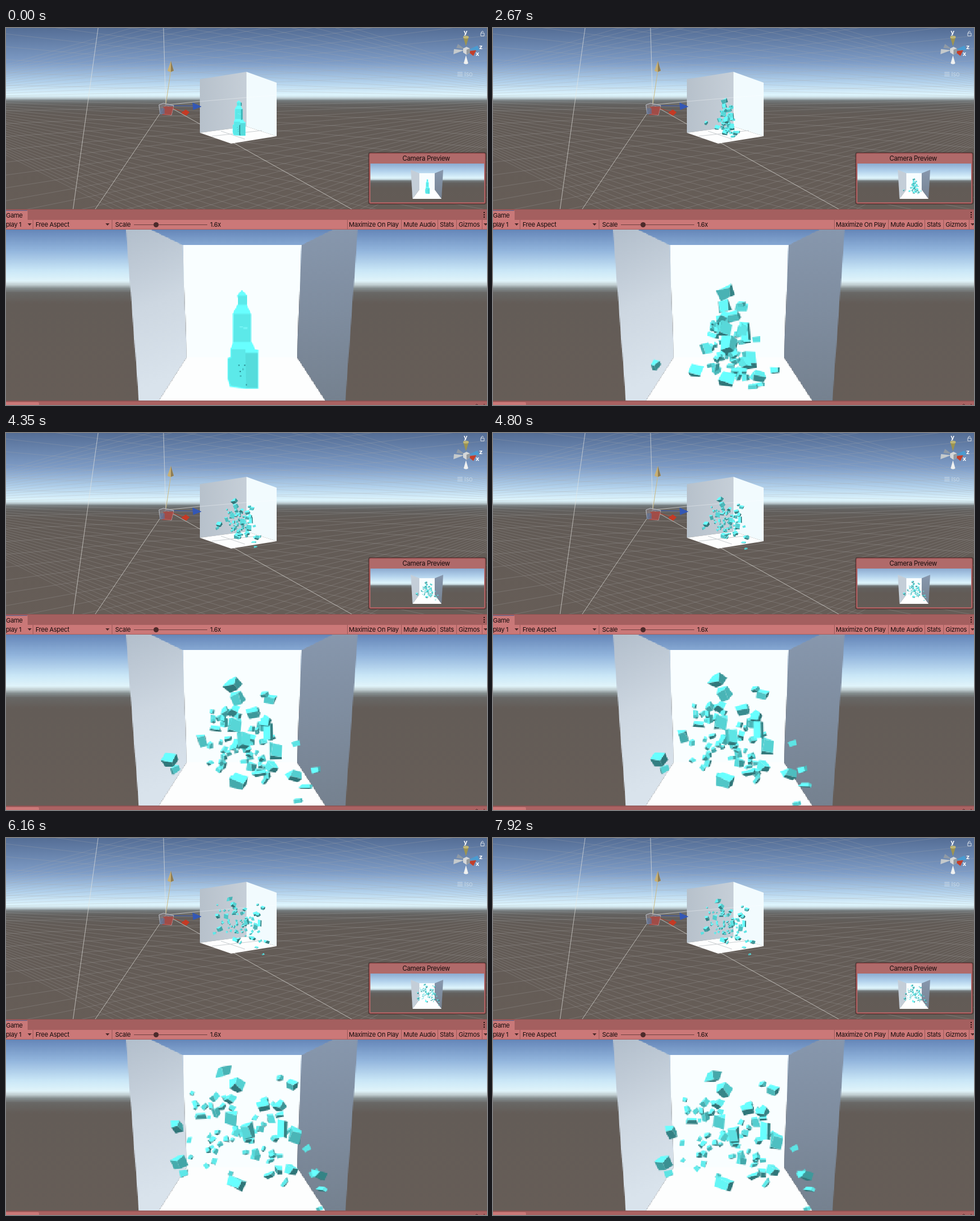
Write an HTML page with a canvas that moves like this. It is 846x662 px and loops after 7990 ms.

```html
<!DOCTYPE html>
<html lang="en">
<head>
<meta charset="utf-8">
<title>Shatter preview</title>
<style>
html, body { margin: 0; width: 100%; height: 100%; overflow: hidden; background: #635c57; }
svg, canvas { position: absolute; left: 0; top: 0; display: block; }
#game { top: 354px; width: 846.4px; height: 300.8px; image-rendering: pixelated; }
#foot { top: 654px; }
text { font: 11px Inter, "Open Sans", sans-serif; letter-spacing: -.3px; fill: #160b0b; }
</style>
</head>
<body>
<svg id="ui" width="846" height="662" viewBox="0 0 846 662">
  <defs>
    <linearGradient id="sky" x2="0" y2="1">
      <stop offset="0" stop-color="#546d95"/><stop offset=".19" stop-color="#7e9cc6"/>
      <stop offset=".3" stop-color="#b3d2ec"/><stop offset=".37" stop-color="#def5fd"/>
      <stop offset=".387" stop-color="#c3d6dd"/><stop offset=".4" stop-color="#747b7d"/>
      <stop offset=".425" stop-color="#62605e"/><stop offset=".48" stop-color="#625b56"/>
      <stop offset="1" stop-color="#665d57"/>
    </linearGradient>
    <linearGradient id="side"><stop offset="0" stop-color="#b7c1cb"/><stop offset="1" stop-color="#c6cfd8"/></linearGradient>
    <linearGradient id="dim" x2="0" y2="1"><stop offset="0" stop-color="#8797ad"/><stop offset="1" stop-color="#778392"/></linearGradient>
    <clipPath id="top"><path d="M0 0H846V318H0Z"/></clipPath>
  </defs>

  <g clip-path="url(#top)">
    <rect width="846" height="318" fill="url(#sky)"/>
    <path id="grid" fill="none" stroke="#a9aaa9" stroke-opacity=".27"/>
    <g fill="none" stroke="#e6e6e2" stroke-opacity=".65">
      <path d="M162 0 118 318M277 0 281 135 157 318M281 135 608 318M281 135 341 129"/>
    </g>
    <path d="M341 90 423 77V173L341 184Z" fill="url(#side)"/>
    <path d="M423 77 476 96V190L423 173Z" fill="#f2fbfe"/>
    <path d="M341 184 423 173 476 190 396 203Z" fill="#fdfefe"/>
    <path d="M362 190 450 180M378 181 420 195" stroke="#c9cdd0" fill="none"/>
    <path d="M341 129 423 122 476 118" stroke="#fff" stroke-opacity=".35" fill="none"/>

    <path d="M281 135 290 74" stroke="#cbb983"/>
    <path d="M290 58 284 75Q289 79 295 75Z" fill="#c9b073"/>
    <path d="M290 58 290 77 295 75Z" fill="#8e7d55"/>
    <path d="M281 136 330 137" stroke="#3f5fb8"/>
    <path d="M328 131 344 138 329 144Z" fill="#3357b5"/>
    <path d="M281 137 312 147" stroke="#b8412c"/>
    <path d="M308 149 316 143 323 148 317 154Z" fill="#c53a24"/>
    <path d="M269 135 277 132 295 136 291 153 271 150Z" fill="#8b7f83" fill-opacity=".65" stroke="#b9c0c9"/>
    <path d="M277 138H295L291 153H275Z" fill="#b03c35" fill-opacity=".7"/>
    <path d="M271 141H279V151H270Z" fill="#5e7297" fill-opacity=".7"/>

    <path d="M804 15H814L809 32Z" fill="#9d9450"/><ellipse cx="809" cy="16" rx="5" ry="2.5" fill="#c0b777"/>
    <path d="M809 48 805 62Q809 65 813 62Z" fill="#f0f1f0"/>
    <path d="M806 39 788 37 787 46Z" fill="#c5cacc"/><path d="M807 37 795 28 792 35Z" fill="#8f9aa6"/>
    <path d="M814 38 829 31 833 39Z" fill="#4a9bd0"/><path d="M812 41 827 39 822 49Z" fill="#c43e29"/>
    <path d="M804 36 810 33 816 36V43L810 47 804 43Z" fill="#d5d7d8"/><path d="M810 38 816 36V43L810 47Z" fill="#959ba0"/>
    <g font-weight="bold" style="fill:#fff">
      <text x="805" y="11" style="fill:#fff;font-weight:700">y</text>
      <text x="832" y="37" style="fill:#fff;font-weight:700">z</text>
      <text x="826" y="49" style="fill:#fff;font-weight:700">x</text>
    </g>
    <path d="M835 9H841V14H835ZM836 9V7Q838 4 840 7" fill="none" stroke="#d8dee6"/>
    <path d="M794 78H803M794 81H803M794 84H803" stroke="#e4eef6" stroke-opacity=".7"/>
    <text x="806" y="85" style="fill:#dbe8f2;fill-opacity:.6">Iso</text>
  </g>

  <rect x="637" y="218" width="208" height="92" rx="4" fill="#3a2524" fill-opacity=".55"/>
  <rect x="639" y="220" width="204" height="88" rx="2" fill="#b06a6a" stroke="#a0494b"/>
  <text x="739" y="233" text-anchor="middle" style="font-size:11.4px">Camera Preview</text>
  <svg x="641" y="238" width="200" height="68" viewBox="0 0 200 68">
    <rect y="-37" width="200" height="168" fill="url(#sky)"/>
    <path d="M86 17H113V46H86Z" fill="#f8fdff"/>
    <path d="M71 11 86 17V46L74 62Z" fill="#c4ced8"/>
    <path d="M128 11 113 17V46L125 62Z" fill="url(#dim)"/>
    <path d="M86 46H113L125 62H74Z" fill="#fff"/>
  </svg>

  <rect y="318" width="846" height="18" fill="#a45f5f"/>
  <path d="M0 318.5H846" stroke="#8d5251"/>
  <path d="M0 320H36Q38 320 38 322V336H0Z" fill="#c97878"/>
  <path d="M0 320.5H37" stroke="#56608f"/>
  <path d="M841 323V325M841 327V329M841 331V333" stroke="#2a1515" stroke-width="2"/>
  <rect y="336" width="846" height="18" fill="#cb7878"/>
  <path d="M38 336.5H846M0 353.5H846" stroke="#a66060"/>
  <path d="M47.500 337V353M186.500 337V353M600.500 337V353M695.500 337V353M759.500 337V353M792.500 337V353M837.500 337V353" stroke="#9b5959"/>
  <path d="M38 343H45L41.500 347ZM175 343H182L178.500 347ZM840 343H847L843.500 347Z" fill="#4b2828"/>
  <path d="M225 345.500H354" stroke="#6f4040"/><circle cx="264" cy="345.500" r="4.500" fill="#4c2a2a"/>
  <text x="0" y="333">Game</text>
  <text x="27" y="349" text-anchor="end">Display 1</text>
  <text x="52" y="349">Free Aspect</text>
  <text x="192" y="349">Scale</text>
  <text x="359" y="349">1.6x</text>
  <text x="603" y="349">Maximize On Play</text>
  <text x="699" y="349">Mute Audio</text>
  <text x="763" y="349">Stats</text>
  <text x="796" y="349">Gizmos</text>
</svg>
<canvas id="view" width="846" height="318"></canvas>
<canvas id="game" width="529" height="188"></canvas>
<svg id="foot" width="846" height="8" viewBox="0 654 846 8">
  <rect y="655" width="846" height="7" fill="#aa6262"/>
  <path d="M0 655H846" stroke="#8e5150" stroke-width="1.500"/>
  <path d="M0 657H56Q58 657 58 659V662H0Z" fill="#cb7878"/>
  <path d="M826 662Q827 659 830 662M841 660V662" stroke="#47292a" fill="none"/>
</svg>

<script>
const LOOP = 7990;
const view = document.getElementById('view').getContext('2d');
const game = document.getElementById('game').getContext('2d');

let seed = 41;
const rnd = () => {
  seed = (seed * 1664525 + 1013904223) >>> 0;
  return seed / 4294967296;
};
const spread = n => (rnd() - .5) * 2 * n;

// Perspective fans for the ground grid
let grid = '';
for (let k = -14; k <= 24; k++) {
  const y = 123 + k * 13;
  for (const vx of [1000, -200]) {
    const far = vx > 0 ? -100 : 950;
    const dy = (y - 123) * (far - vx) / (423 - vx);
    grid += `M${vx} 123L${far} ${(123 + dy).toFixed(1)}`;
  }
}
document.getElementById('grid').setAttribute('d', grid);

// x, y, vx, vy, half width, half height
const main = [
  [415, 475, -8.8, -17.8, 13, 12], [425, 503, 21.5, -18.8, 13, 9],
  [427, 498, 15, -21, 8, 5], [418, 514, 10, -12, 13, 9],
  [399, 531, -19.5, -22.8, 4, 5], [396, 550, -14.5, -17, 12, 5],
  [391, 575, -24.5, -18.7, 9, 11], [399, 617, -68, -26, 14, 13],
  [390, 597, -180, -10, 8, 8], [425, 612, 115, -18, 9, 6],
  [440, 547, 38, -1, 9, 6], [441, 592, 18.7, -18.7, 13, 17],
  [445, 617, 33, -8, 13, 9], [436, 629, 50, -5, 14, 4],
  [429, 621, 46, 13, 9, 4], [413, 620, -2.5, -3.8, 15, 13],
  [427, 603, 10, -3, 15, 5], [432, 590, 19, -2, 9, 10],
  [421, 613, 19, -2, 4, 11], [407, 500, 0, -18, 13, 12],
  [406, 519, -3.2, -16.7, 8, 14], [410, 534, -4, -11.5, 11, 15],
  [435, 536, 14, -7, 9, 18], [432, 543, 14, -20, 9, 11]
];

const shard = ([x, y, vx, vy, w, h]) => {
  const d = Math.min(w, h) * .8 + 1;
  const pts = Array.from({ length: 8 }, (_, i) => [
    (i & 1 ? w : -w) * (.5 + rnd() * .5),
    (i & 2 ? h : -h) * (.5 + rnd() * .5),
    (i & 4 ? d : -d) * (.55 + rnd() * .45)
  ]);
  return { x, y, vx, vy, pts, depth: spread(20),
    turn: [spread(.6), spread(.6), spread(.35)],
    spin: [spread(.4), spread(.4), spread(.16)] };
};

const filler = Array.from({ length: 52 }, () => {
  const x = 395 + rnd() * 43, y = 515 + rnd() * 108;
  return [x, y, (x - 416) * .75 + spread(6), -7 - rnd() * 13, 3 + rnd() * 6, 3 + rnd() * 6];
});
const shards = [...filler, [414, 563, 3, -13, 13, 15], ...main].map(shard);

// Blast progress: a scrubbed timeline that runs forward, then back
const keys = [[1900, 0], [2670, .62], [3750, 1.24], [4350, 1.85], [5320, 2.8],
  [6160, 3.65], [6640, 4.1], [6760, 4.1], [7990, 3.09]];
const progress = t => {
  if (t <= keys[0][0]) return 0;
  const i = keys.findIndex(k => t <= k[0]);
  const [t0, a] = keys[i - 1], [t1, b] = keys[i];
  return a + (b - a) * (t - t0) / (t1 - t0);
};

const place = (p, s) => {
  const flare = Math.max(0, p.y - 590) * .7;
  const wall = p.vx < 0 ? 286 : 532 + flare;
  const hit = p.vx ? (wall - p.x) / p.vx : 99;
  const free = Math.min(s, hit), rest = s - free;
  return [p.x + p.vx * free + rest * (p.vx < 0 ? 9 : -2),
    Math.min(651, p.y + p.vy * free + rest * p.vy * .1)];
};

const rotate = ([x, y, z], [a, b, c]) => {
  const roll = (u, v, r) => [u * Math.cos(r) - v * Math.sin(r), u * Math.sin(r) + v * Math.cos(r)];
  [y, z] = roll(y, z, a);
  [z, x] = roll(z, x, b);
  [x, y] = roll(x, y, c);
  return [x, y, z];
};

const dark = [48, 118, 121], lit = [104, 255, 255];
const shade = k => `rgb(${dark.map((v, i) => Math.round(v + (lit[i] - v) * k))})`;

const poly = (c, fill, pts) => {
  c.fillStyle = fill;
  c.beginPath();
  pts.forEach(([x, y]) => c.lineTo(x, y));
  c.fill();
};

// Visible faces of a shard with their light level
const faces = (p, s) => {
  const v = p.pts.map(q => rotate(q, p.turn.map((a, i) => a + p.spin[i] * s)));
  const out = [];
  for (let axis = 0; axis < 3; axis++) {
    const A = 1 << axis, B = 1 << (axis + 1) % 3, C = 1 << (axis + 2) % 3;
    for (const o of [0, A]) {
      const f = [v[o], v[o + B], v[o + B + C], v[o + C]];
      const e = f[2].map((n, i) => n - f[0][i]), g = f[3].map((n, i) => n - f[1][i]);
      let n = [e[1] * g[2] - e[2] * g[1], e[2] * g[0] - e[0] * g[2], e[0] * g[1] - e[1] * g[0]];
      const len = Math.hypot(...n) * (o ? 1 : -1);
      n = n.map(k => k / len);
      if (n[2] <= 0) continue;
      const light = -.3 * n[0] - .72 * n[1] + .68 * n[2];
      out.push([f, shade(Math.max(0, Math.min(1, light * 1.15 + .08)))]);
    }
  }
  return out;
};

const drawShards = (c, s, map, size) => {
  for (const p of shards) {
    const [x, y] = map(...place(p, s), p.depth * s / 3.65);
    for (const [f, fill] of faces(p, s))
      poly(c, fill, f.map(q => [x + q[0] * size, y + q[1] * size]));
  }
};

const drawTower = c => {
  const front = '#5ce9e9', edge = '#68ffff';
  poly(c, edge, [[415, 460], [424, 469], [424, 473], [407, 473], [407, 469]]);
  poly(c, front, [[408, 470], [424, 470], [424, 487], [408, 487]]);
  poly(c, edge, [[407, 486], [424, 486], [431, 502], [431, 553], [399, 553], [399, 502]]);
  poly(c, front, [[401, 502], [431, 502], [431, 552], [400, 552]]);
  poly(c, edge, [[400, 551], [433, 551], [438, 564], [444, 565], [444, 633], [421, 633], [394, 630], [390, 616], [390, 579], [395, 577], [395, 563]]);
  poly(c, front, [[396, 564], [421, 564], [421, 570], [443, 570], [443, 632], [422, 632], [396, 628], [391, 615], [391, 581], [396, 579]]);
  poly(c, '#55dcdc', [[421, 571], [443, 571], [443, 631], [423, 631]]);
  c.fillStyle = '#2d8b90';
  for (const [x, y] of [[409, 591], [419, 591], [411, 602], [416, 598], [412, 610], [422, 625]]) c.fillRect(x, y, 2, 2);
  c.fillStyle = '#8affff';
  c.fillRect(411, 524, 6, 1.5);
  c.fillRect(418, 526, 7, 1.5);
};

const ramp = (c, x0, y0, x1, y1, stops) => {
  const g = c.createLinearGradient(x0, y0, x1, y1);
  stops.forEach(([o, col]) => g.addColorStop(o, col));
  return g;
};

const sky = ramp(game, 0, 354, 0, 655, [[0, '#6586b8'], [.12, '#91b4dc'], [.24, '#cae7f7'],
  [.3, '#e0f4fa'], [.32, '#c3d1d4'], [.345, '#81898a'], [.37, '#686765'], [.43, '#635c57'], [1, '#665d57']]);
const leftWall = ramp(game, 215, 360, 320, 600, [[0, '#b3bfcc'], [.5, '#cdd7e1'], [1, '#d9e3ec']]);
const rightWall = ramp(game, 0, 354, 0, 655, [[0, '#8797ad'], [1, '#75818f']]);

const drawRoom = c => {
  c.fillStyle = sky;
  c.fillRect(0, 353, 847, 303);
  poly(c, '#f9feff', [[311, 381], [520, 381], [512, 579], [318, 579]]);
  poly(c, '#fdfefe', [[318, 578], [512, 578], [563, 656], [268, 656]]);
  poly(c, leftWall, [[211, 353], [253, 353], [311, 381], [318, 578], [268, 656], [234, 656]]);
  poly(c, rightWall, [[619, 353], [577, 353], [520, 381], [512, 578], [563, 656], [597, 656]]);
};

const draw = t => {
  const s = progress(t);

  game.setTransform(1 / 1.6, 0, 0, 1 / 1.6, 0, -354 / 1.6);
  drawRoom(game);
  if (s) drawShards(game, s, (x, y) => [x, y], 1);
  else drawTower(game);

  view.setTransform(1, 0, 0, 1, 0, 0);
  view.clearRect(0, 0, 846, 318);
  if (s) {
    drawShards(view, s, (x, y, z) => [410 + (x - 415) * .25 + z, 189 + (y - 632) * .36 + (x - 415) * .06], .38);
    drawShards(view, s, (x, y) => [741 + (x - 415) * .145, 291 + (y - 632) * .15], .15);
  } else {
    view.setTransform(.42, 0, 0, .36, 410 - 417 * .42, 189 - 632 * .36);
    drawTower(view);
    poly(view, '#359a9e', [[424, 470], [428, 472], [428, 487], [424, 487]]);
    poly(view, '#3cb4b7', [[425, 504], [432, 502], [432, 553], [425, 556]]);
    poly(view, '#359a9e', [[417, 582], [422, 578], [422, 633], [417, 628]]);
    view.setTransform(.145, 0, 0, .15, 741 - 415 * .145, 291 - 632 * .15);
    drawTower(view);
  }
};

const tick = () => {
  draw(performance.now() % LOOP);
  requestAnimationFrame(tick);
};
tick();
</script>
</body>
</html>
```
